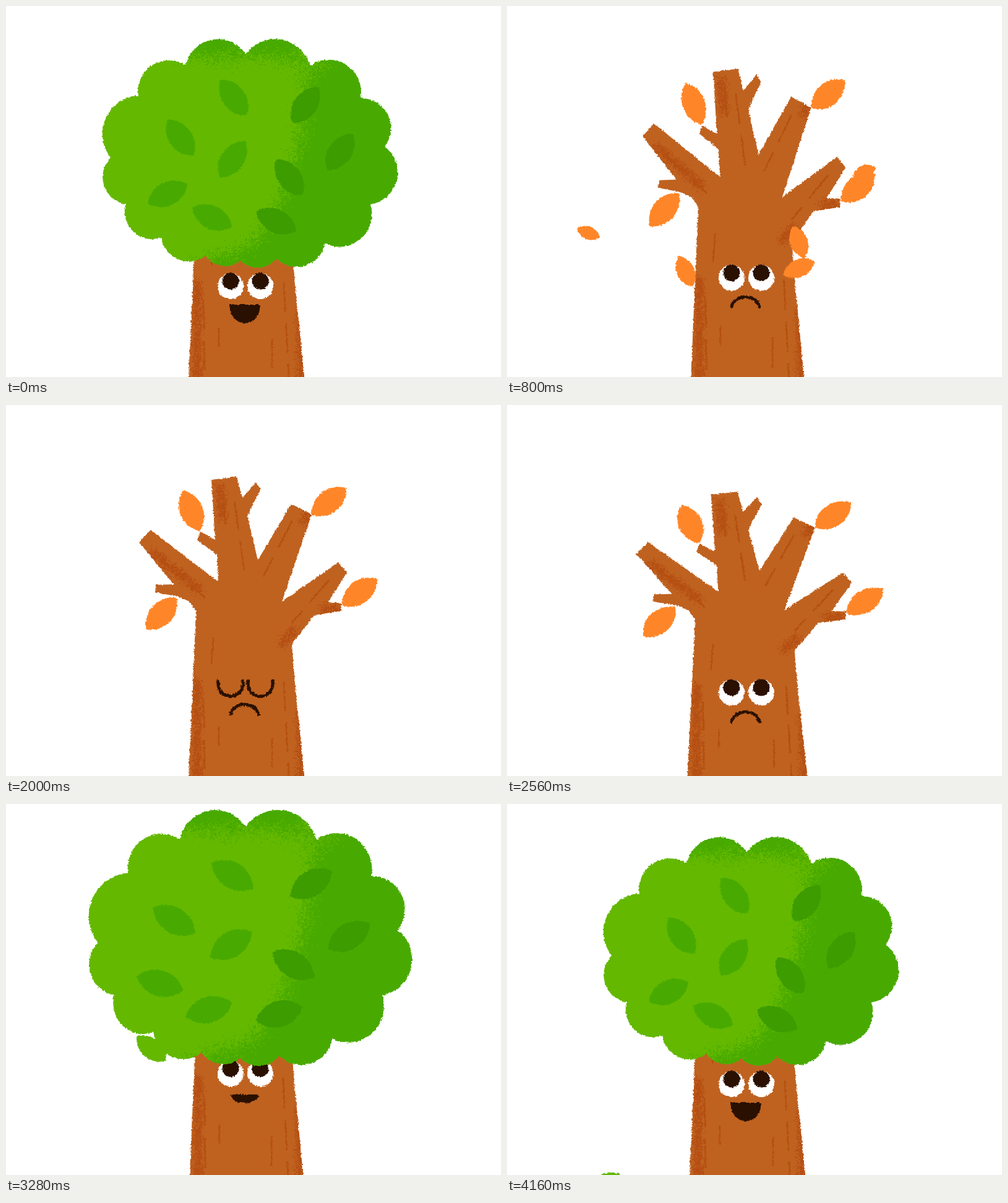
These frames come from a looping animation (800x600 px, 4240 ms). An HTML page with a canvas:

```html
<!DOCTYPE html>
<html lang="en">
<head>
<meta charset="utf-8">
<title>Tree through the seasons</title>
<style>
html, body { margin: 0; width: 100%; height: 100%; overflow: hidden; background: #fff; }
canvas { display: block; width: 800px; height: 600px; }
</style>
</head>
<body>
<canvas id="stage" width="800" height="600"></canvas>
<script>
const W = 800, H = 600, LOOP = 4240, STEP = 80, MIDDLE = 388;
const INK = '#2a1000', GREEN = '#64b800', ORANGE = '#ff8628';

const newContext = () => {
  const c = document.createElement('canvas');
  c.width = W;
  c.height = H;
  return c.getContext('2d', { willReadFrequently: true });
};
const stage = document.getElementById('stage').getContext('2d');
const ctx = newContext();

let seed = 7;
const random = () => (seed = (seed * 16807) % 2147483647) / 2147483647;
const radians = deg => deg * Math.PI / 180;
const mix = (a, b, k) => `rgb(${a.map((v, i) => Math.round(v + (b[i] - v) * k))})`;

const ramp = (t, from, to) => Math.min(1, Math.max(0, (t - from) / (to - from)));
const smooth = (t, from, to) => {
  const k = ramp(t, from, to);
  return k * k * (3 - 2 * k);
};
const wave = (t, from, period) => t < from ? 0 : Math.sin((t - from) / period * 2 * Math.PI);
// Grows from 0 to 1 with a springy overshoot.
const pop = (dt, decay) => 1 - Math.exp(-dt / decay) * Math.cos(dt / 480 * 2 * Math.PI);

// Pose of the whole tree at a given time.
function poseAt(t) {
  const spring = t >= 3200;
  const rebound = .045 * wave(t, 720, 320) * Math.exp(-Math.max(0, t - 720) / 200);
  const sob = t < 1840 ? -.014 * wave(t, 1280, 560) : 0;
  const crouch = smooth(t, 2160, 2560), jump = smooth(t, 2640, 2880), settle = smooth(t, 3040, 3520);
  const droop = spring ? 0 : ramp(t, 160, 480) ** 2;
  const falling = spring ? 0 : Math.max(0, t - 480);
  return {
    droop,
    season: spring ? 0 : ramp(t, 160, 400),
    fall: 1.06 * falling + .0042 * falling ** 2,
    leafTurn: spring ? ramp(t, 3280, 3920) - 1 : droop,
    crownX: spring ? 1 + .65 * (pop(t - 3120, 130) - 1) : 1 + .0001 * falling,
    crownY: spring ? pop(t - 3120, 112) : 1,
    trunk: 1 + rebound + sob - .05 * crouch + .1 * jump - .05 * settle,
    face: -450 * (rebound + sob) + 12 * crouch - 46 * jump + 34 * settle,
    sway: -400 * sob,
    grin: t < 560 ? 1 : ramp(t, 3040, 3920)
  };
}

const notchAngles = [-91, -63, -35, -6, 27, 56, 78, 93, 108, 129, 153, 180, 217, 243];
// Neighbours in this list tilt opposite ways.
const crownLeaves = [[368, 148], [484, 160], [282, 213], [366, 248], [458, 277], [540, 236], [333, 342], [261, 304], [437, 348]];
// Stem x, y and direction.
const lastLeaves = [[313, 204, 248], [494, 178, -38], [543, 324, -37], [276, 312, 134]];
// Stem x, y, direction and number of leaves in the fan.
const buds = [[345, 146, 205, 1], [392, 148, -25, 3], [479, 186, -55, 2], [216, 213, -150, 3], [230, 286, -65, 1],
  [320, 255, -75, 3], [493, 281, -132, 2], [522, 278, -8, 1], [545, 308, 202, 1], [284, 310, 10, 4]];
// Centre and angle halfway down.
const autumnDrop = [[134, 535, 28], [580, 436, -14], [474, 550, 78], [291, 597, 72], [474, 592, -18]];
const springDrop = [[174, 475, 30], [600, 549, -38], [187, 587, 30]];

const trunkPath = new Path2D(`M295 600L302 450 307 333 297 318 279 310 241 303 242 291 271 290 215 222 234 202
  343 286 341 242 309 218 314 205 338 218 332 121 373 116 382 150 404 125 411 137 390 180 407 251 461 160 494 177
  446 318 537 254 551 271 520 319 542 320 542 333 498 340 462 387 467 450 482 600Z`);
const barkPath = new Path2D(`M351 145L355 195M369 155L386 275M462 188L416 277M250 248L322 312M522 283L462 353
  M335 375L332 420M319 475L321 590M344 520V552M449 447L457 600M430 538V600`);

const noise = (() => {
  const cells = Array.from({ length: W * H / 4 }, random);
  return Float32Array.from({ length: W * H }, (_, i) =>
    .5 * cells[(i / W >> 1) * (W / 2) + (i % W >> 1)] + .5 * random());
})();

// Soft shapes turned into speckles; returns a function that tints them.
function grain(blur, paint) {
  const g = newContext();
  g.filter = `blur(${blur}px)`;
  paint(g);
  g.filter = 'none';
  const img = g.getImageData(0, 0, W, H);
  for (let i = 0; i < W * H; i++)
    img.data[i * 4 + 3] = img.data[i * 4 + 3] / 255 > noise[i] * .9 + .05 ? 255 : 0;
  g.putImageData(img, 0, 0);
  g.globalCompositeOperation = 'source-in';
  return color => {
    g.fillStyle = color;
    g.fillRect(0, 0, W, H);
    return g.canvas;
  };
}

const crownGrain = grain(20, g =>
  g.fill(new Path2D('M485 0Q500 240 415 365Q400 402 300 412V500H800V0ZM270 0H520V105Q450 76 388 82H270Z')));
const trunkGrain = grain(6, g => {
  g.lineWidth = 18;
  g.globalAlpha = .75;
  g.stroke(new Path2D(`M309 440V620M476 490L478 620M345 125L350 190M232 235L320 305M490 170L478 195
    M505 330H545M440 390L470 360`));
})('#b2480f');

// Some 2px cells sample a neighbour, which frays the edges.
const frayed = (() => {
  const shift = () => Math.round((random() - .5) * 1.6);
  const cells = Array.from({ length: W * H / 4 }, () => [shift(), shift()]);
  const clamp = (v, max) => Math.max(0, Math.min(max - 1, v));
  return Int32Array.from({ length: W * H }, (_, i) => {
    const x = i % W, y = i / W | 0;
    const [dx, dy] = cells[(y >> 1) * (W / 2) + (x >> 1)];
    return clamp(y + dy, H) * W + clamp(x + dx, W);
  });
})();

function inGroup(paint) {
  ctx.save();
  paint();
  ctx.restore();
}

function scaleFrom(x, y, sx, sy) {
  ctx.translate(x, y);
  ctx.scale(sx, sy);
  ctx.translate(-x, -y);
}

// A leaf growing from its stem.
function leaf(x, y, len, deg, color) {
  inGroup(() => {
    ctx.translate(x, y);
    ctx.rotate(radians(deg));
    ctx.beginPath();
    ctx.moveTo(0, 0);
    ctx.bezierCurveTo(len * .25, len * .35, len * .75, len * .35, len, 0);
    ctx.bezierCurveTo(len * .75, -len * .35, len * .25, -len * .35, 0, 0);
    ctx.fillStyle = color;
    ctx.fill();
  });
}

function centredLeaf(x, y, len, deg, color) {
  const a = radians(deg);
  leaf(x - Math.cos(a) * len / 2, y - Math.sin(a) * len / 2, len, deg, color);
}

function drawTrunk(t, pose) {
  scaleFrom(MIDDLE, H, 1 - (pose.trunk - 1) * .75, pose.trunk);
  for (const [x, y, deg] of lastLeaves)
    leaf(x, y, 71, deg + (x < MIDDLE ? 1 : -1) * pose.sway, ORANGE);
  ctx.fillStyle = '#bf6220';
  ctx.fill(trunkPath);
  inGroup(() => {
    ctx.clip(trunkPath);
    ctx.drawImage(trunkGrain, 0, 0);
  });
  ctx.strokeStyle = '#b4500f';
  ctx.lineWidth = 2.6;
  ctx.setLineDash([48, 18]);
  ctx.stroke(barkPath);

  if (t > 3440) return;
  buds.forEach(([x, y, deg, count], i) => {
    const grown = ramp(t, 2760 + i % 5 * 20, 2940 + i % 5 * 20);
    for (let j = 0; j < count && grown; j++)
      leaf(x, y, 47 * grown, deg + 66 * (j - (count - 1) / 2), GREEN);
  });
}

function ellipse(x, y, rx, ry, color, end = 2 * Math.PI) {
  ctx.beginPath();
  ctx.ellipse(x, y, rx, ry, 0, 0, end);
  ctx.fillStyle = color;
  ctx.fill();
}

function drawFace(t, pose) {
  ctx.translate(0, pose.face);
  ctx.strokeStyle = INK;
  ctx.lineWidth = 5;
  ctx.lineCap = 'round';
  if (t >= 1360 && t < 1840) {
    const u = ramp(t, 1360, 1840);
    ellipse(349 - 4 * u, 472 + 140 * u * u, 8 - 2 * u, 5 + 4 * u, '#5cc0ee');
  }
  for (const x of [363, 411]) {
    if (t >= 900 && t < 2560) {
      ctx.stroke(new Path2D(`M${x - 20} 446v5a20 20 0 0 0 40 0v-5`));
    } else {
      ellipse(x, 453, 21, 21, '#fff');
      ellipse(x, 445, 13.5, 13.5, INK);
    }
  }
  if (t >= 560 && t < 2640) {
    ctx.stroke(new Path2D('M363 500A23 20 0 0 1 408 500'));
  } else {
    const k = Math.sqrt(pose.grin);
    ellipse(386, 491 - 8 * k, 20 + 5 * k, 8 + 22 * pose.grin, INK, Math.PI);
  }
}

function drawLooseLeaves(t) {
  if (t >= 560 && t < 2000) {
    const dt = t - 1360, swing = Math.sin(dt / 200);
    for (const [x, y, deg] of autumnDrop)
      centredLeaf(x + 7 * swing, y + .3 * dt, y < 540 ? 40 : 55, deg + 18 * swing, ORANGE);
  }
  if (t >= 3280) {
    const dt = t - 3600, before = Math.min(0, dt);
    for (const [x, y, deg] of springDrop)
      centredLeaf(x + (x < MIDDLE ? -.15 : .15) * before, y + .246 * dt - .0011 * before ** 2, 62, deg - dt * .03, GREEN);
  }
}

// Round bulges between notches on an ellipse; the middle sags with the droop.
function crownPath(droop) {
  const notches = notchAngles.map(deg => {
    const x = 391 + 222 * Math.cos(radians(deg)), y = 245 + 167 * Math.sin(radians(deg));
    return [x, y + droop * (15 + 42 * Math.exp(-(((x - 370) / 90) ** 2)))];
  });
  let d = `M${notches[0]}`;
  notches.forEach(([x, y], i) => {
    const next = notches[(i + 1) % notches.length];
    const chord = Math.hypot(next[0] - x, next[1] - y);
    const height = Math.max(10, Math.min(33, chord / 2 - 16));
    const r = (chord * chord / 4 + height * height) / (2 * height);
    d += `A${r} ${r} 0 0 1 ${next}`;
  });
  return new Path2D(d + 'Z');
}

function drawCrown(t, pose) {
  if (t >= 800 && t < 3200) return;
  const { droop, season } = pose, path = crownPath(droop);
  ctx.translate(0, pose.fall);
  scaleFrom(MIDDLE, 420, pose.crownX, pose.crownY);
  ctx.fillStyle = mix([100, 184, 0], [222, 140, 34], season);
  ctx.fill(path);
  inGroup(() => {
    ctx.clip(path);
    ctx.drawImage(crownGrain(mix([72, 170, 0], [213, 124, 8], season)), 0, 42 * droop);
  });
  crownLeaves.forEach(([x, y], i) => {
    const lean = (y > 290 ? 64 : 36) * (1 - .65 * pose.leafTurn);
    const color = x > 430 ? mix([60, 156, 0], [255, 85, 16], season) : mix([72, 170, 0], [255, 108, 14], season);
    centredLeaf(x, y + 36 * droop, 72, 90 + (i % 2 ? lean : -lean), color);
  });
}

function draw(t) {
  const pose = poseAt(t);
  ctx.fillStyle = '#fff';
  ctx.fillRect(0, 0, W, H);
  for (const layer of [drawTrunk, drawFace, drawLooseLeaves, drawCrown])
    inGroup(() => layer(t, pose));

  const from = new Uint32Array(ctx.getImageData(0, 0, W, H).data.buffer);
  const out = stage.createImageData(W, H);
  const to = new Uint32Array(out.data.buffer);
  for (let i = 0; i < to.length; i++) to[i] = from[frayed[i]];
  stage.putImageData(out, 0, 0);
}

let shown = -1;
function tick() {
  const t = Math.floor(performance.now() % LOOP / STEP) * STEP;
  if (t !== shown) draw(shown = t);
  requestAnimationFrame(tick);
}
tick();
</script>
</body>
</html>
```
